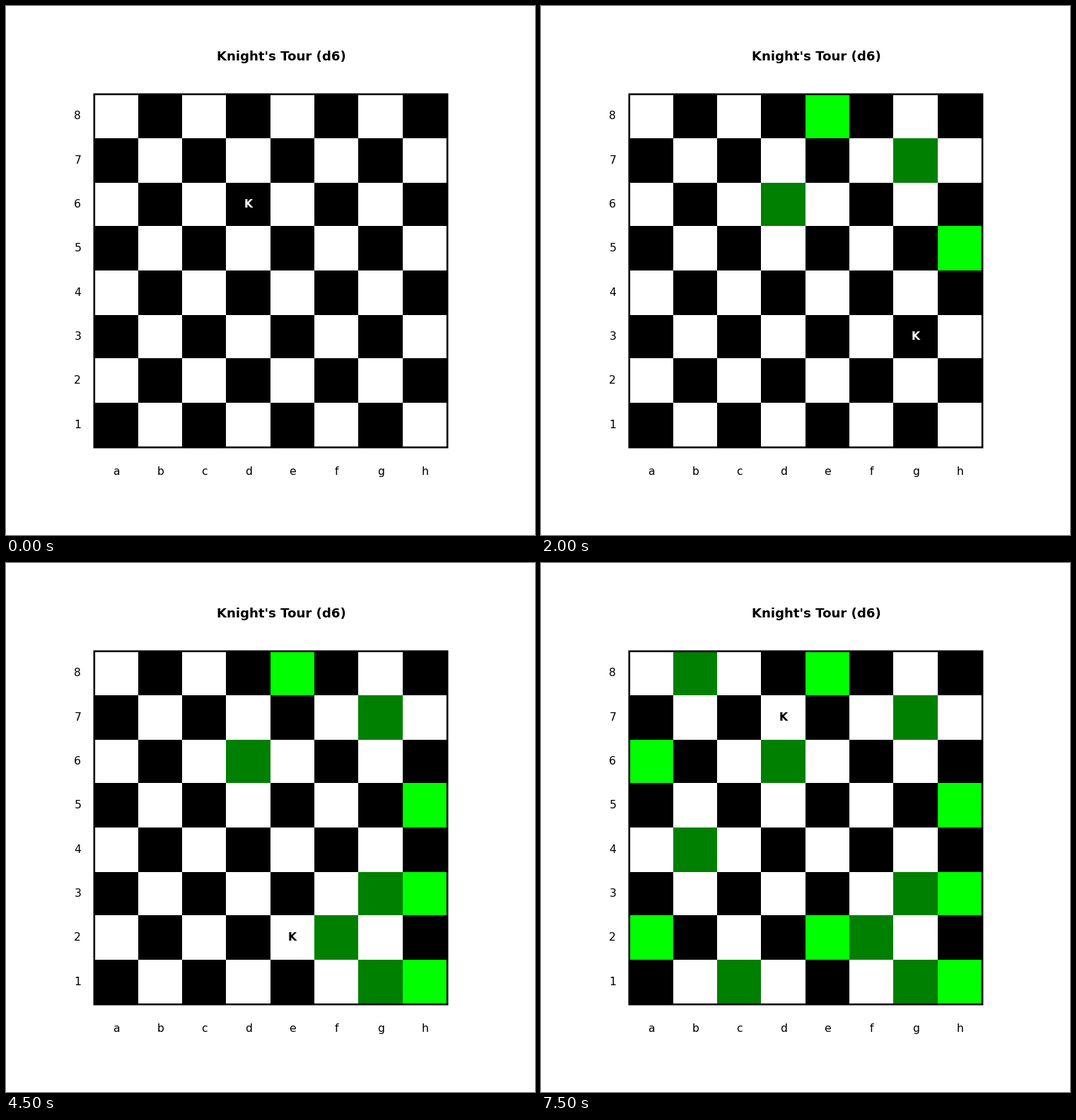
These frames come from a looping animation (748 by 748 pixels, 8 s). A matplotlib script:

```python
import matplotlib.pyplot as plt
from matplotlib.animation import FuncAnimation
from matplotlib.patches import Rectangle

SIZE = 748
CELL = SIZE / 12
FILES = "abcdefgh"
TOUR = "d6 e8 g7 h5 g3 h1 f2 h3 g1 e2 c1 a2 b4 a6 b8 d7".split()

# Pixel edges of the columns and rows, measured from the top left.
XS = [125, 187, 249, 311, 374, 436, 498, 561, 623]
YS = [125, 187, 250, 311, 374, 437, 498, 561, 624]

fig = plt.figure(figsize=(8, 8), dpi=SIZE / 8, facecolor="white")
ax = fig.add_axes([0, 0, 1, 1])
ax.set_xlim(0, SIZE)
ax.set_ylim(SIZE, 0)
ax.axis("off")


def locate(square):
    return FILES.index(square[0]), 8 - int(square[1])


def center(i):
    return (i + 2.5) * CELL


def is_dark(col, row):
    return (col + row) % 2 == 1


def label(x, y, text, **style):
    return ax.text(x, y, text, ha="center", va="center",
                   **{"fontsize": 12, **style})


cells = {}
for row in range(8):
    for col in range(8):
        cells[col, row] = ax.add_patch(Rectangle(
            (XS[col], YS[row]), XS[col + 1] - XS[col], YS[row + 1] - YS[row],
            lw=0, antialiased=False))

ax.add_patch(Rectangle((124.8, 124.8), 499.3, 499.3, fill=False,
                       ec="black", lw=2, zorder=3, snap=False))

for i in range(8):
    label(center(i), 658.7, FILES[i])
    label(101.3, center(i), str(8 - i))
label(389, 72, "Knight's Tour (d6)", fontsize=14, weight="bold")
knight = label(0, 0, "K", weight="bold", zorder=4)


def draw(step):
    visited = {locate(s) for s in TOUR[:step]}
    for pos, cell in cells.items():
        if pos in visited:
            cell.set_facecolor("green" if is_dark(*pos) else "lime")
        else:
            cell.set_facecolor("black" if is_dark(*pos) else "white")
    col, row = locate(TOUR[step])
    knight.set_position((center(col), center(row)))
    knight.set_color("white" if is_dark(col, row) else "black")
    return [*cells.values(), knight]


anim = FuncAnimation(fig, draw, frames=len(TOUR), interval=500, repeat=True)
plt.show()
```
